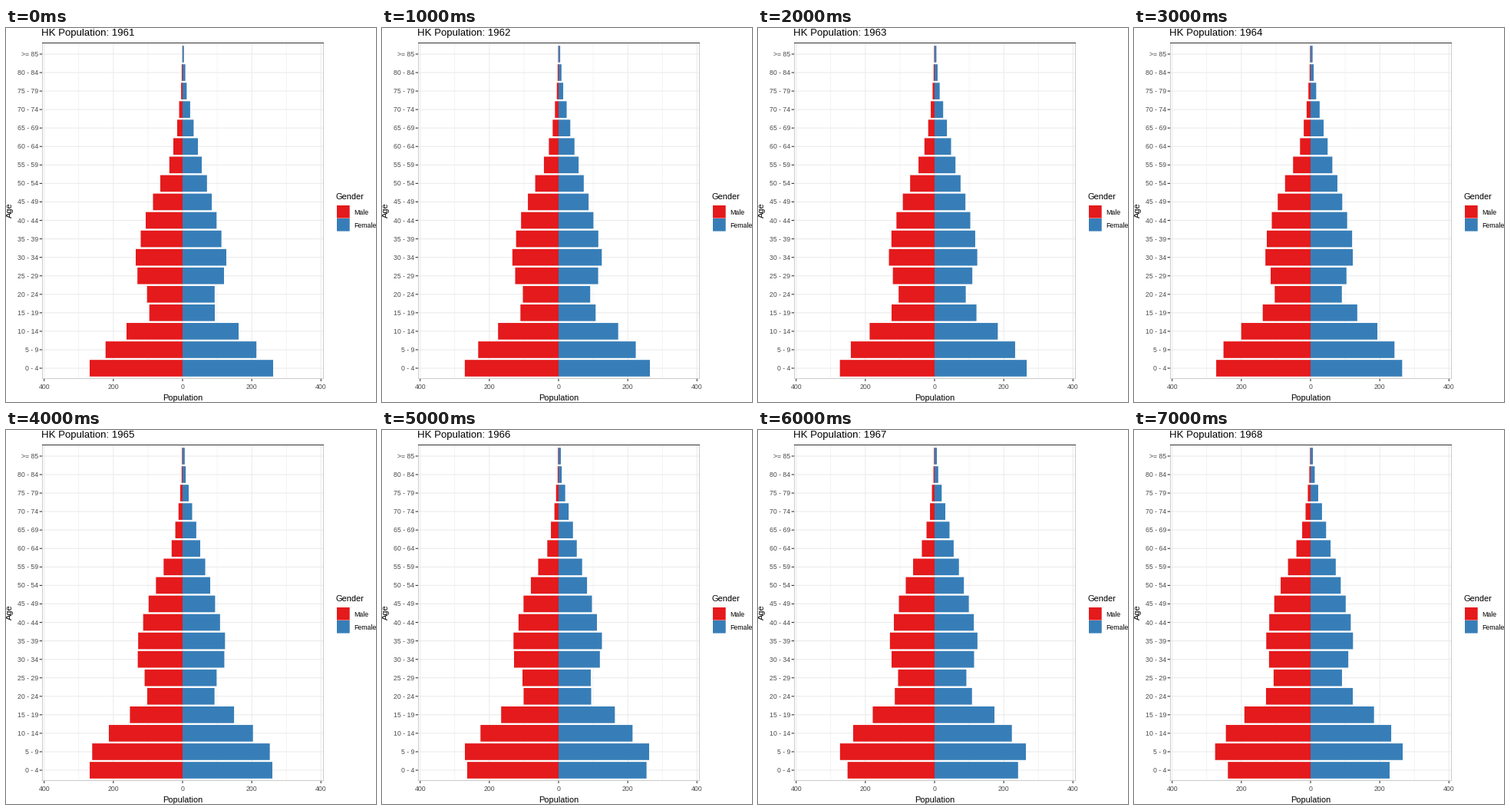
Animation, 482 px wide and 487 px high, one loop 8000 ms. Source, as a matplotlib script:

```python
import numpy as np
import matplotlib.pyplot as plt
from matplotlib.animation import FuncAnimation
from matplotlib.patches import Rectangle

W, H, DPI = 482, 487, 64
PT = 72 / DPI                      # points per pixel
RED, BLUE = "#E41A1C", "#377EB8"
LEFT, RIGHT, TOP, BOTTOM = 47.5, 413.5, 19.5, 457
ZERO, UNIT = 230, 0.4507           # x of zero, pixels per thousand people
ROW0, STEP, GROUPS = 443, 24.06, 18
BAR = 0.9 * STEP
FIRST_YEAR, YEARS = 1961, 8

# Each cohort keeps its size while it ages, apart from a small yearly drift.
# Cohorts are numbered by their age group in the first year; unborn ones are
# negative. Sizes are bar lengths in pixels at a few key cohorts.
COHORTS = [-1.4, -1, -0.5, 0, 1, 2, 3, 3.5, 4, 4.5, 5, 6, 8, 10, 11, 12, 13, 15, 17]
MALE = [106.3, 118, 123.4, 121, 100.3, 73, 43.3, 46.3, 46.3, 53.3, 58.8, 61,
        48, 29, 17.2, 12, 7, 1.9, 0.3]
FEMALE = [103, 114.6, 120.5, 118, 96.2, 73, 42, 40.2, 41.8, 48, 54, 57,
          44.3, 31.8, 25, 20, 14.4, 5.4, 1.8]
DRIFT_AT = [0, 3, 6, 11, 15, 17]
MALE_DRIFT = [0.2, 0.44, -0.46, -0.5, -0.15, 0]
FEMALE_DRIFT = [0, 0.1, -0.1, -0.25, -0.25, 0]

plt.rcParams["font.family"] = "Liberation Sans"

fig = plt.figure(figsize=(W / DPI, H / DPI), dpi=DPI, facecolor="white")
ax = fig.add_axes([0, 0, 1, 1])
ax.set_xlim(0, W)
ax.set_ylim(H, 0)
ax.axis("off")


def line(x0, y0, x1, y1, color, width=1.0, z=1):
    ax.plot([x0, x1], [y0, y1], color=color, lw=width * PT, zorder=z,
            solid_capstyle="butt", snap=False)


def label(x, y, text, size=8.8, color="black", ha="left", **kw):
    return ax.text(x, y, text, fontsize=size * PT, color=color, ha=ha,
                   va="baseline", **kw)


def box(x, y, w, h, color):
    return ax.add_patch(Rectangle((x, y), w, h, fc=color, lw=0, zorder=2,
                                  snap=False))


def lengths(sizes, drift, elapsed):
    cohort = np.arange(GROUPS) - elapsed / 5
    change = elapsed * np.interp(cohort, DRIFT_AT, drift)
    return np.maximum(np.interp(cohort, COHORTS, sizes) + change, 0)


# Grid, ticks and tick labels
rows = [ROW0 - STEP * i for i in range(GROUPS)]
ages = [f"{a} - {a + 4}" for a in range(0, 85, 5)] + [">= 85"]
for value in range(-400, 401, 100):
    x = ZERO + value * UNIT
    if value % 200:
        line(x, TOP, x, BOTTOM, "#EBEBEB", 0.53)
    else:
        line(x, TOP, x, BOTTOM, "#EBEBEB", 1.07)
        line(x, BOTTOM, x, BOTTOM + 3, "#333333", 1.07)
        label(x, 470, str(abs(value)), color="#4D4D4D", ha="center")
for y, age in zip(rows, ages):
    line(LEFT, y, RIGHT, y, "#EBEBEB", 1.07)
    line(43.7, y, LEFT - 0.5, y, "#333333", 1.07)
    label(42, y + 3, age, color="#4D4D4D", ha="right")

# Panel border: dark on top, pale on the other sides
for x in (LEFT, RIGHT):
    line(x, TOP, x, BOTTOM, "#CCCCCC", z=3)
line(LEFT - 0.5, BOTTOM - 0.5, RIGHT + 0.5, BOTTOM - 0.5, "#CCCCCC", z=3)
line(LEFT - 0.5, TOP, RIGHT + 0.5, TOP, "#333333", z=4)

# Axis titles and legend
label(230, 485, "Population", 11, ha="center")
label(8, 237.5, "Age", 11, ha="center", rotation=90, rotation_mode="anchor")
label(430, 223, "Gender", 11)
for y, name, color in ((231, "Male", RED), (248, "Female", BLUE)):
    box(431, y, 16.7, 16.6, color)
    label(453, y + 11.9, name)

title = label(46, 10, "", 13.2)
males = [box(ZERO, y - BAR / 2, 0, BAR, RED) for y in rows]
females = [box(ZERO, y - BAR / 2, 0, BAR, BLUE) for y in rows]


def update(frame):
    title.set_text(f"HK Population: {FIRST_YEAR + frame}")
    for bar, size in zip(males, lengths(MALE, MALE_DRIFT, frame)):
        bar.set_x(ZERO - size)
        bar.set_width(size)
    for bar, size in zip(females, lengths(FEMALE, FEMALE_DRIFT, frame)):
        bar.set_width(size)
    return [title, *males, *females]


anim = FuncAnimation(fig, update, frames=YEARS, interval=1000, repeat=True,
                     repeat_delay=0, blit=False)
plt.show()
```
